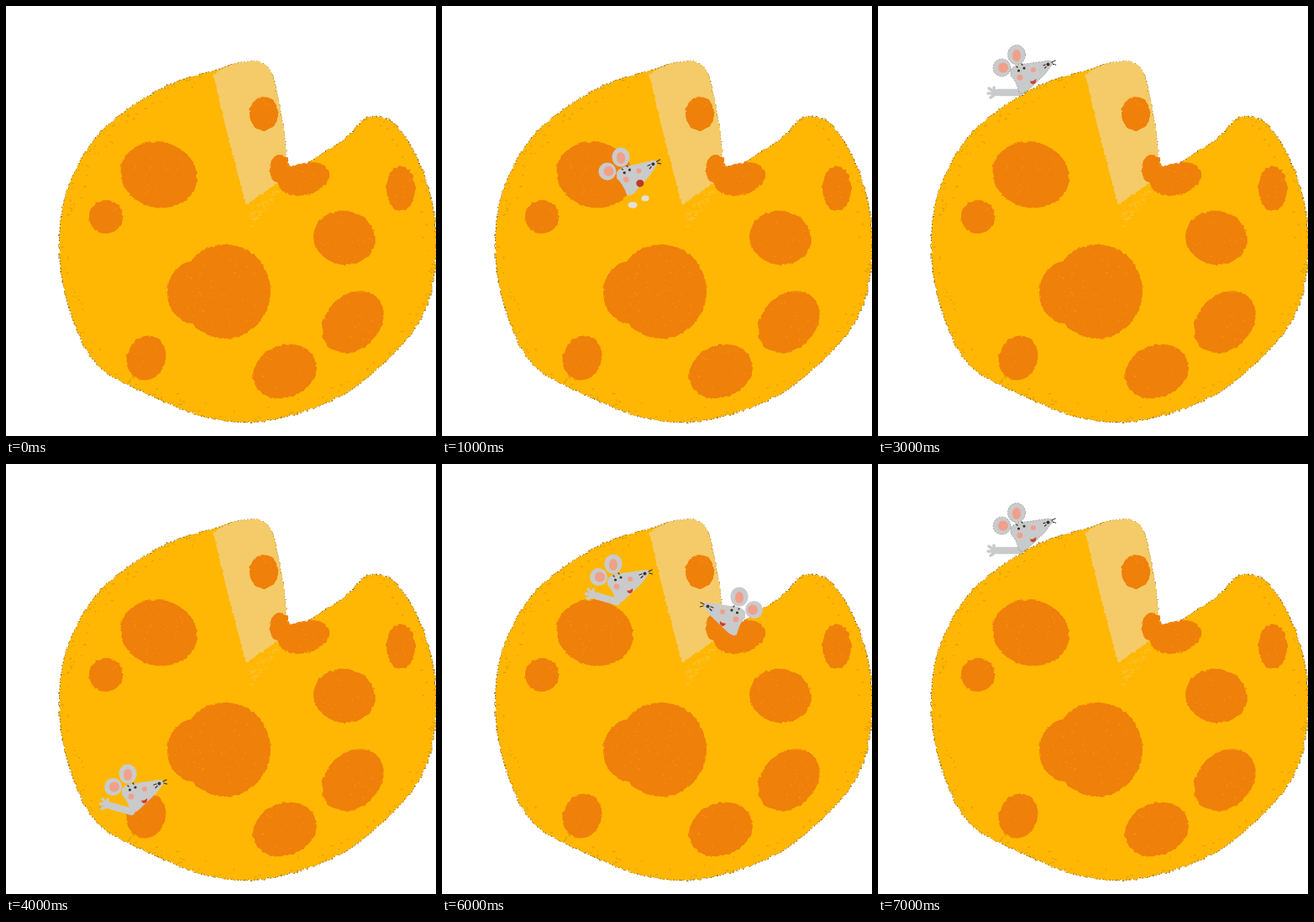
An HTML page for the animation above (8000 ms loop, 512x512 px).

```html
<!DOCTYPE html>
<html lang="en">
<head>
<meta charset="utf-8">
<title>Mouse in the cheese</title>
<style>
  html, body { margin: 0; width: 100%; height: 100%; overflow: hidden; background: #fff; }
  svg { display: block; width: 100%; height: 100%; }
  .grey { fill: #c9cacb; }
  .pink { fill: #f0a08a; stroke: none; }
  .ink { fill: #3a3226; stroke: none; }
  .line { fill: none; stroke: #3a3226; stroke-width: 1.3; stroke-linecap: round; }
  .arm { fill: none; stroke: #c9cacb; stroke-linecap: round; stroke-linejoin: round; }
  .paw { fill: #e2e0da; }

  /* Each pose holds for one second of the eight-second loop. */
  .pose { visibility: hidden; animation: peek 8s step-end calc(var(--at) * 1s) infinite; }
  .pose.twice { animation-name: peek-twice; animation-duration: 4s; }
  @keyframes peek { 0% { visibility: visible; } 12.5%, 100% { visibility: hidden; } }
  @keyframes peek-twice { 0% { visibility: visible; } 25%, 100% { visibility: hidden; } }
</style>
</head>
<body>
<svg viewBox="0 0 512 512">
  <defs>
    <filter id="rough" filterUnits="userSpaceOnUse" x="0" y="0" width="512" height="512" color-interpolation-filters="sRGB">
      <feTurbulence type="fractalNoise" baseFrequency=".2" numOctaves="2" seed="4"/>
      <feDisplacementMap in="SourceGraphic" scale="4" xChannelSelector="R" yChannelSelector="G"/>
    </filter>

    <!-- Head facing right, upper ear at the origin. -->
    <g id="head">
      <g class="grey">
        <ellipse rx="10.5" ry="11.5"/>
        <circle cx="-17.5" cy="15.5" r="10.5"/>
        <path d="M-7 18Q-2 11 10 11L38 7Q44 7 42 12L34 23L13 43Q7 48 3 45Q0 32-7 25Z"/>
      </g>
      <ellipse class="pink" cy="1" rx="5" ry="7"/>
      <circle class="pink" cx="-16" cy="15.5" r="6"/>
      <circle class="pink" cx="4" cy="27" r="3.4"/>
      <circle class="pink" cx="20" cy="18" r="3"/>
      <circle class="ink" cx="2.5" cy="19" r="1.6"/>
      <circle class="ink" cx="9" cy="16" r="1.6"/>
      <path class="line" d="M1 15l-1-1M7 12l-1-1"/>
      <circle class="ink" cx="37.5" cy="11.5" r="2"/>
      <path class="line" d="M34 12l-3 1M35 14.5l-2 2M42 9l4-2M43 11l3.5 1"/>
    </g>
    <g id="peeker">
      <use href="#head"/>
      <path fill="#d43d28" d="M16 31.5q4 1 7-2.5q1 5-3 6q-3 0-4-3.5z"/>
    </g>
    <g id="arm" class="arm">
      <path stroke-width="8.5" d="M4 45H-22"/>
      <path stroke-width="3.5" d="M-24 46l-9-6M-25 46h-9M-25 47l-6 4M-26 44l-1-5"/>
    </g>
    <g id="waver"><use href="#arm" transform="rotate(16 4 46)"/><use href="#peeker"/></g>
    <g id="climber">
      <use href="#head"/>
      <circle fill="#bd3a24" cx="20" cy="33" r="4.5"/>
    </g>
    <g id="paws" class="paw">
      <ellipse cx="32" cy="40" rx="4.5" ry="3.5"/>
      <ellipse cx="17" cy="48" rx="5.5" ry="3.8"/>
    </g>
  </defs>

  <g class="pose twice" style="--at:3" transform="translate(165 58)">
    <use href="#arm"/>
    <use href="#peeker" stroke="#85827c" stroke-width=".6" stroke-dasharray="2 1.5"/>
  </g>

  <g filter="url(#rough)">
    <path id="rind" fill="#ffb703" stroke="#765000" stroke-width=".8" stroke-dasharray="2 2"/>
    <path fill="#f4cb68" d="M247 82Q262 68 290 66C314 64 319 82 324 110Q332 152 334 180L339 200L286 237Q264 158 247 82Z"/>
    <g id="holes" fill="#ef800a">
      <ellipse cx="182" cy="201" rx="46" ry="39" transform="rotate(15 182 201)"/>
      <ellipse cx="119" cy="251" rx="20" ry="20"/>
      <ellipse cx="261" cy="340" rx="54" ry="56"/>
      <ellipse cx="223" cy="341" rx="31" ry="37"/>
      <ellipse cx="167" cy="419" rx="23" ry="27" transform="rotate(20 167 419)"/>
      <ellipse cx="332" cy="435" rx="39" ry="31" transform="rotate(-22 332 435)"/>
      <ellipse cx="413" cy="376" rx="41" ry="32" transform="rotate(-45 413 376)"/>
      <ellipse cx="403" cy="276" rx="37" ry="32" transform="rotate(10 403 276)"/>
      <ellipse cx="470" cy="217" rx="17" ry="27"/>
      <ellipse cx="307" cy="128" rx="17" ry="20"/>
      <ellipse cx="326" cy="194" rx="12" ry="17"/>
      <ellipse cx="355" cy="206" rx="31" ry="19" transform="rotate(-15 355 206)"/>
    </g>
    <path id="rimGrain" fill="none" stroke="#dca000" stroke-width="1.3"/>
    <path id="tipGrain" fill="none" stroke="#ffbf24" stroke-width="1.6"/>
    <path id="holeGrain" fill="none" stroke="#f59418"/>
  </g>

  <g class="pose" style="--at:1" transform="translate(213 180)">
    <use href="#climber" transform="rotate(-5)"/>
    <use href="#paws" transform="translate(-3 9)"/>
  </g>
  <g class="pose" style="--at:2" transform="translate(407 256) scale(-1 1)">
    <use href="#climber" transform="rotate(-16)"/>
    <use href="#paws"/>
  </g>
  <use class="pose" style="--at:4" href="#waver" transform="translate(145 369)"/>
  <use class="pose" style="--at:5" href="#peeker" transform="translate(400 331) scale(-1 1)"/>
  <g class="pose" style="--at:6">
    <use href="#waver" transform="translate(204 119)"/>
    <use href="#peeker" transform="translate(354 158) scale(-1 1)"/>
  </g>
</svg>
<script>
  const $ = id => document.getElementById(id);

  // Catmull-Rom curve through the points, continuing from the first one.
  function curve(points) {
    const at = i => points[Math.max(0, Math.min(points.length - 1, i))];
    const lean = (p, from, to) => p.map((v, k) => v + (to[k] - from[k]) / 6);
    return points.slice(1).map((p, i) =>
      `C${lean(at(i), at(i - 1), p)} ${lean(p, at(i + 2), at(i))} ${p}`).join('');
  }

  const outline = ('339,200 402,159 430,133 460,138 488,178 507,232 512,300 494,373 437,437 385,471 ' +
    '310,494 243,491 180,467 113,431 80,375 64,300 72,222 112,151 185,98 257,74')
    .split(' ').map(pair => pair.split(',').map(Number));
  const rind = $('rind');
  rind.setAttribute('d', `M339 200${curve(outline)}Q272 67 290 66C314 64 319 82 324 110Q332 152 334 180Z`);

  let seed = 7;
  const random = () => (seed = seed * 16807 % 2147483647) / 2147483647;

  function grain(id, count, size, place) {
    let d = $(id).getAttribute('d') || '';
    for (let i = 0; i < count; i++) {
      const [x, y] = place();
      d += `M${x.toFixed(1)} ${y.toFixed(1)}h${(size * (.5 + random())).toFixed(1)}`;
    }
    $(id).setAttribute('d', d);
  }

  for (const hole of $('holes').children) {
    const [cx, cy, rx, ry] = ['cx', 'cy', 'rx', 'ry'].map(name => +hole.getAttribute(name));
    grain('holeGrain', rx * ry / 40, 1.2, () => {
      const angle = random() * Math.PI * 2, r = Math.sqrt(random()) * .8;
      return [cx + rx * r * Math.cos(angle), cy + ry * r * Math.sin(angle)];
    });
  }

  // Ochre grain just inside the rind, stopping short of the cut face.
  const length = rind.getTotalLength();
  grain('rimGrain', 190, 1.8, () => {
    const { x, y } = rind.getPointAtLength(length * (.06 + .8 * random()));
    const inward = .01 + .07 * random() ** 2;
    return [x + (288 - x) * inward, y + (290 - y) * inward];
  });

  grain('tipGrain', 45, 3, () => {
    const t = random() ** 1.5;
    return [288 + 30 * t + 4 * random(), 240 - 22 * t + 24 * random() * (1 - t * .6)];
  });
</script>
</body>
</html>
```
